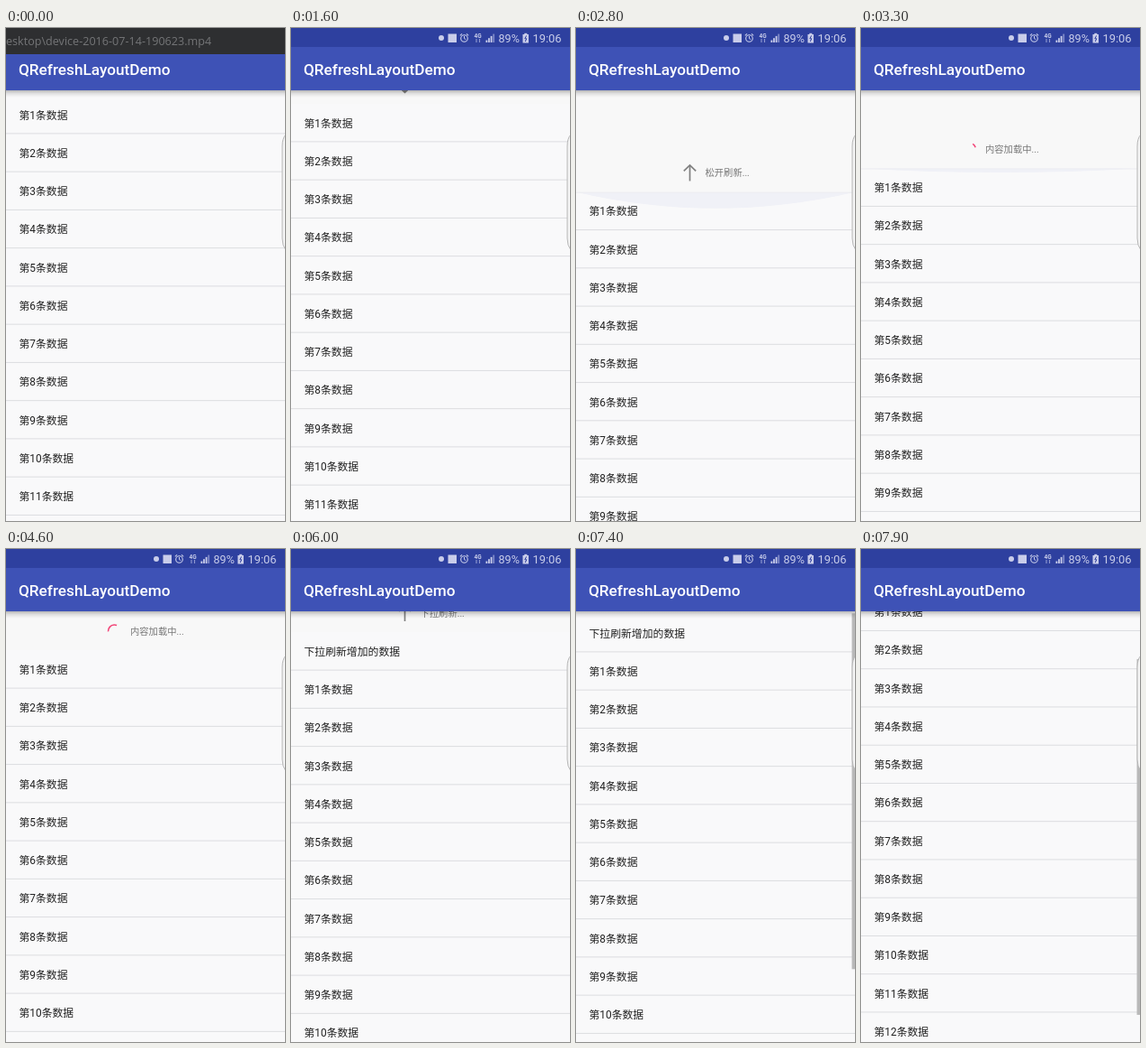
These frames come from a looping animation (310 px wide and 546 px high, 8 s). An HTML page with a canvas:

```html
<!DOCTYPE html>
<html lang="zh-CN">
<head>
<meta charset="utf-8">
<title>QRefreshLayoutDemo</title>
<style>
html, body { margin: 0; width: 310px; height: 546px; overflow: hidden; background: #f9f9fa; }
canvas { display: block; width: 310px; height: 546px; }
</style>
</head>
<body>
<canvas id="stage"></canvas>
<script>
const W = 310, H = 546, LOOP = 8000, STEP = 100;
const BAR = 69, REST = 75, ROW = 42.25;
const RELEASE = 3200, LOADED = 4700;
const FONT = 'Roboto, "Noto Sans CJK SC", "Noto Sans CJK", sans-serif';

// [time, top edge of the list]
const PATH = [
  [0, 75], [1500, 75], [1600, 84], [1800, 120], [2100, 163.5], [2400, 177],
  [2600, 177], [2900, 184], [3200, 177], [3300, 155.5], [3400, 127], [3500, 112.2],
  [4700, 112.2], [4800, 103], [5000, 84], [5300, 75], [5900, 75], [6000, 92.2],
  [6300, 132], [6600, 163], [6800, 172.5], [6900, 172], [7100, 146],
  [7400, 72], [7700, 14], [7900, 6.3], [8000, 6.3]
];

const canvas = document.getElementById('stage');
const c = canvas.getContext('2d');
const dpr = window.devicePixelRatio || 1;
canvas.width = W * dpr;
canvas.height = H * dpr;

const clamp = x => Math.max(0, Math.min(1, x));
const ease = x => { x = clamp(x); return x * x * (3 - 2 * x); };

function listTop(t) {
  const i = PATH.findIndex(p => p[0] > t);
  const [t0, y0] = PATH[i - 1], [t1, y1] = PATH[i];
  return y0 + (y1 - y0) * (t - t0) / (t1 - t0);
}

function rect(x, y, w, h, color) {
  c.fillStyle = color;
  c.fillRect(x, y, w, h);
}

function text(s, x, y, size, color, weight = 400, family = FONT) {
  c.font = `${weight} ${size}px ${family}`;
  c.fillStyle = color;
  c.fillText(s, x, y);
}

function stroke(points, color, width) {
  c.strokeStyle = color;
  c.lineWidth = width;
  c.beginPath();
  points.forEach(([x, y], i) => i ? c.lineTo(x, y) : c.moveTo(x, y));
  c.stroke();
}

function disc(x, y, r, color) {
  c.fillStyle = color;
  c.beginPath();
  c.arc(x, y, r, 0, 7);
  c.fill();
}

function arrow(x, y, dir) {
  stroke([[x, y + 9 * dir], [x, y - 8.5 * dir]], '#808080', 1.7);
  stroke([[x - 6.7, y - 2 * dir], [x, y - 8.5 * dir], [x + 6.7, y - 2 * dir]], '#808080', 1.7);
}

function spinner(x, y, t) {
  const cycle = 1040, grow = 150;
  const dt = t - 3300, k = Math.floor(dt / cycle), u = dt / cycle - k;
  const tail = -58 + dt * 0.342 + grow * (k + ease(u * 2 - 1));
  const len = 40 + grow * (ease(u * 2) - ease(u * 2 - 1));
  c.strokeStyle = '#f2487a';
  c.lineWidth = 1.6;
  c.beginPath();
  c.arc(x, y, 7, tail * Math.PI / 180, (tail + len) * Math.PI / 180);
  c.stroke();
}

function pullHeader(t, top) {
  const y = top - 21.2;
  if (t >= RELEASE && t < LOADED) {
    spinner(120.5, y, t);
    text('内容加载中...', 138, y + 4, 10.3, '#777');
    return;
  }
  const ready = top > 118;
  arrow(126.5, y, ready || t >= LOADED ? 1 : -1);
  text(ready ? '松开刷新...' : '下拉刷新...', 143.5, y + 4, 10.3, '#777');
}

function bulge(t, top) {
  const held = t < RELEASE || t >= LOADED ? 1 : 0.3;
  const h = Math.min(18, (top - 112.5) * 0.35) * held;
  if (h <= 0) return;
  c.fillStyle = t < LOADED ? '#f0f1f7' : '#e7e9f4';
  c.beginPath();
  c.moveTo(0, top);
  c.quadraticCurveTo(W / 2, top + 2 * h, W, top);
  c.fill();
  rect(0, top, W, 1, '#ededf1');
}

function list(t, top) {
  const extra = t >= LOADED ? 1 : 0;
  for (let i = 0; i < 15; i++) {
    const y = top + i * ROW;
    const label = extra && !i ? '下拉刷新增加的数据' : `第${i + 1 - extra}条数据`;
    text(label, 14.5, y + 25.6, 11.85, '#222');
    rect(0, y + 41.4, W, 1, '#dcdde0');
  }
}

function edge(top) {
  if (top < REST) rect(306.5, BAR + (REST - top) * 0.77, 3.5, 394, '#b9b9b9');
  c.beginPath();
  c.moveTo(311, 118);
  c.quadraticCurveTo(307, 122, 307, 131);
  c.lineTo(307, 233);
  c.quadraticCurveTo(307, 241, 311, 246);
  c.fillStyle = '#f5f5f5';
  c.fill();
  c.strokeStyle = '#b4b4b4';
  c.lineWidth = 1;
  c.stroke();
}

function statusBar() {
  const ink = '#c9cdea';
  rect(0, 0, W, 21, '#2e409f');
  disc(167, 11, 3, ink);
  rect(174.5, 6.5, 9.5, 9.5, ink);
  // alarm
  c.strokeStyle = ink;
  c.lineWidth = 1.1;
  c.beginPath();
  c.arc(192.5, 11.5, 3.8, 0, 7);
  c.stroke();
  stroke([[192.5, 9], [192.5, 11.7], [194.3, 12.6]], ink, 1);
  stroke([[187.8, 8.3], [190, 6.4]], ink, 1.1);
  stroke([[195, 6.4], [197.2, 8.3]], ink, 1.1);
  // network
  text('4G', 203.5, 10.5, 6.5, ink, 700);
  stroke([[206, 12], [206, 16]], '#8d96cf', 1.2);
  stroke([[209.5, 12], [209.5, 16]], '#8d96cf', 1.2);
  for (let i = 0; i < 4; i++) {
    const h = 2.5 + i * 2.3;
    rect(216.5 + i * 2.6, 16 - h, 1.8, h, i < 3 ? ink : '#7f89c8');
  }
  text('89%', 230.5, 15.7, 12.6, ink);
  // battery
  rect(257.5, 7, 6.5, 9.5, ink);
  rect(259.3, 5.8, 3, 1.5, ink);
  stroke([[261.6, 8.5], [259.8, 11.8], [261.8, 11.8], [260.2, 15]], '#303f9f', 1);
  text('19:06', 268.5, 15.7, 12.9, ink);
}

function toolbar() {
  const g = c.createLinearGradient(0, BAR, 0, BAR + 8);
  g.addColorStop(0, 'rgba(0,0,0,.27)');
  g.addColorStop(0.4, 'rgba(0,0,0,.11)');
  g.addColorStop(0.75, 'rgba(0,0,0,.04)');
  g.addColorStop(1, 'rgba(0,0,0,0)');
  rect(0, BAR, W, 8, g);
  rect(0, 21, W, BAR - 21, '#3e52b6');
  text('QRefreshLayoutDemo', 14, 52, 17.2, '#fff', 500);
}

function playerBar(t) {
  const a = t < 300 ? 1 : clamp((500 - t) / 300);
  if (!a) return;
  c.globalAlpha = a;
  rect(0, 0, W, 29, '#2e2f31');
  text('esktop\\device-2016-07-14-190623.mp4', 0, 19, 12.6, '#747577', 400, '"Open Sans", "Noto Sans", sans-serif');
  c.globalAlpha = 1;
}

function draw(t) {
  const top = listTop(t);
  c.setTransform(dpr, 0, 0, dpr, 0, 0);
  rect(0, 0, W, H, '#f9f9fa');
  if (top > REST) rect(0, BAR, W, top - BAR, '#f8f8f8');
  pullHeader(t, top);
  bulge(t, top);
  list(t, top);
  edge(top);
  toolbar();
  statusBar();
  playerBar(t);
}

const start = performance.now();
function tick() {
  const t = (performance.now() - start) % LOOP;
  draw(Math.floor(t / STEP) * STEP);
  requestAnimationFrame(tick);
}
tick();
</script>
</body>
</html>
```
